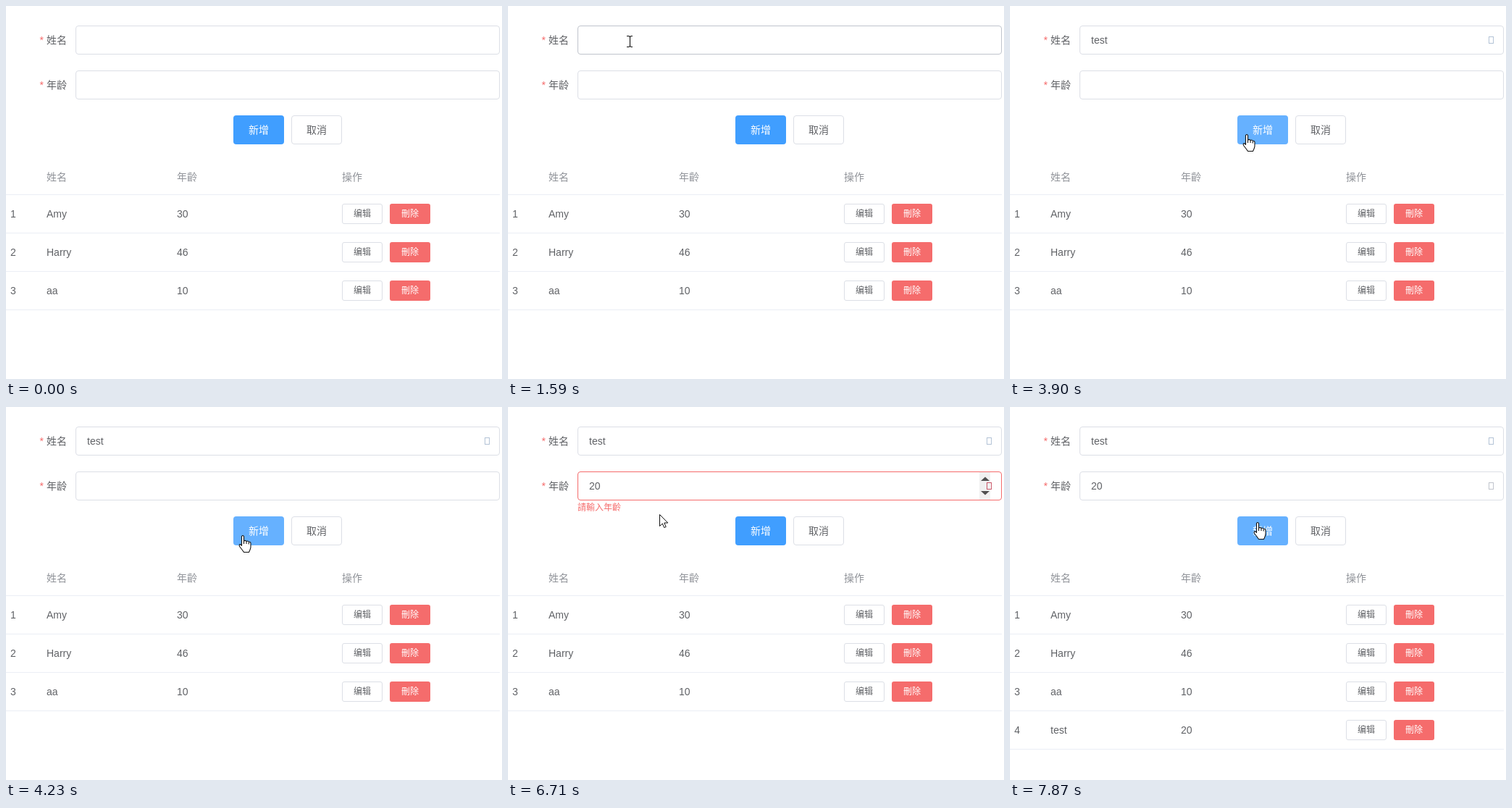
Recreate the animation shown at these times as an HTML page. Size 685x515 px, loop 8 s.

```html
<!DOCTYPE html>
<html lang="zh">
<head>
<meta charset="utf-8">
<style>
html, body { margin: 0; width: 100%; height: 100%; overflow: hidden; background: #fff; }
svg { display: block; width: 685px; height: 515px; }
text { font: 14px "Liberation Sans", "Noto Sans CJK SC", "Noto Sans CJK TC", "Noto Sans CJK", sans-serif; fill: #606266; white-space: pre; }
.head { fill: #909399; }
.mid { text-anchor: middle; }
.small { font-size: 12px; }
.white { fill: #fff; }
.red { fill: #f56c6c; }
</style>
</head>
<body>
<svg id="stage" viewBox="0 0 685 515" xmlns="http://www.w3.org/2000/svg"></svg>
<script>
const LOOP = 8000;
const stage = document.getElementById('stage');

function add(tag, attrs, parent = stage, content) {
  const el = document.createElementNS('http://www.w3.org/2000/svg', tag);
  for (const k in attrs) el.setAttribute(k, attrs[k]);
  if (content !== undefined) el.textContent = content;
  parent.appendChild(el);
  return el;
}
const label = (x, y, s, cls = '', parent = stage) => add('text', { x, y, class: cls }, parent, s);
const box = (x, y, width, height, rx, fill, stroke = 'none', parent = stage) =>
  add('rect', { x, y, width, height, rx, fill, stroke }, parent);
const outline = (x, y, w, h, r, parent = stage) =>
  box(x + .5, y + .5, w - 1, h - 1, r, '#fff', '#dcdfe6', parent);

// Form
function field(y, name) {
  label(46.5, y + 25, '*', 'red');
  label(56, y + 25, name);
  const frame = outline(96, y, 586, 40, 3.5);
  const spin = add('g', {});
  const value = label(112, y + 25, '');
  const caret = box(112, y + 12, 1, 16, 0, '#303133');
  const icon = add('rect', { x: 661.5, y: y + 15.5, width: 6, height: 9, fill: 'none' });
  return { frame, spin, value, caret, icon };
}
const nameField = field(27, '姓名');
const ageField = field(89, '年龄');
box(651, 90, 15, 38, 0, '#f0f0f0', 'none', ageField.spin);
add('path', { d: 'M653 102L659 96.5L665 102ZM653 116L659 121.5L665 116Z', fill: '#505050' }, ageField.spin);
const error = label(96, 143, '請輸入年齡', 'small red');
const addButton = box(314, 151, 70, 40, 4, '#409eff');
label(349, 176, '新增', 'mid white');
outline(394, 151, 70, 40, 3.5);
label(429, 176, '取消', 'mid');

// Table
label(56, 241, '姓名', 'head');
label(236, 241, '年齡', 'head');
label(464, 241, '操作', 'head');
box(0, 260, 682, 1, 0, '#ebeef5');
const rows = [['Amy', 30], ['Harry', 46], ['aa', 10], ['test', 20]].map(([who, age], i) => {
  const g = add('g', { transform: `translate(0 ${261 + i * 53})` });
  label(6, 31, i + 1, '', g);
  label(56, 31, who, '', g);
  label(236, 31, age, '', g);
  outline(464, 12, 56, 28, 2.5, g);
  label(492, 30, '编辑', 'mid small', g);
  const del = box(530, 12, 56, 28, 3, '#f56c6c', 'none', g);
  label(558, 30, '刪除', 'mid small white', g);
  box(0, 52, 682, 1, 0, '#ebeef5', 'none', g);
  return { g, del };
});

// Pointers, each drawn around its hot spot
const pointers = {
  arrow: add('path', {
    d: 'M.5 .5V16.5L4.3 13L6.7 18.5L9.2 17.5L6.8 12H11.8Z',
    fill: '#fff', stroke: '#111', 'stroke-width': 1
  }),
  hand: add('path', {
    d: 'M-1.5 1.5Q0 -.5 1.5 1.5V8Q3.5 6.5 5 8.5Q7 7.3 8.2 9.3Q10.5 8.7 11 11V16Q11 18.5 8.5 23.5H1.5Q-.5 20.5 -4.5 15.5Q-5.5 13 -3.5 12.5L-1.5 14.3ZM1.5 8V12M5 9V12M8.2 10V12.5',
    fill: '#fff', stroke: '#111', 'stroke-width': 1.1, 'stroke-linejoin': 'round'
  }),
  beam: add('path', {
    d: 'M-4 -7.5H-1L.5 -6.5L2 -7.5H4M.5 -6.5V6.5M-4 7.5H-1L.5 6.5L2 7.5H4',
    fill: 'none', stroke: '#111', 'stroke-width': 1.1
  })
};

// time, x, y
const path = [
  [130, 565, 389], [270, 540, 330], [470, 470, 200], [600, 420, 124], [670, 395, 122],
  [800, 366, 160], [900, 326, 173], [970, 294, 174], [1040, 280, 168], [1250, 220, 118],
  [1450, 178, 62], [1600, 167, 48], [3050, 167, 48], [3120, 185, 78], [3200, 215, 136],
  [3340, 255, 181], [3490, 255, 181], [3640, 327, 177], [4300, 327, 177], [4480, 300, 165],
  [4750, 220, 143], [4900, 197, 133], [5120, 197, 133], [5320, 187, 108], [6705, 187, 108],
  [6706, 208, 147], [6780, 228, 163], [6870, 255, 179], [7010, 327, 176], [7200, 341, 165],
  [7600, 341, 152], [7870, 342, 159]
];

function position(t) {
  const i = path.findIndex(p => p[0] > t);
  if (i === 0) return path[0].slice(1);
  if (i < 0) return path[path.length - 1].slice(1);
  const [t0, x0, y0] = path[i - 1], [t1, x1, y1] = path[i];
  const k = (t - t0) / (t1 - t0);
  return [x0 + (x1 - x0) * k, y0 + (y1 - y0) * k];
}
const inside = (x, y, l, top, r, b) => x >= l && x < r && y >= top && y < b;
const during = (t, a, b) => t >= a && t < b;
const ramp = (t, a, d) => Math.min(1, Math.max(0, (t - a) / d));
const pulse = (t, a, b, d) => ramp(t, a, d) - ramp(t, b, d);

function mix(a, b, k) {
  const part = (c, i) => parseInt(c.slice(i, i + 2), 16);
  return 'rgb(' + [1, 3, 5].map(i => Math.round(part(a, i) + (part(b, i) - part(a, i)) * k)) + ')';
}
const show = (el, on) => el.setAttribute('visibility', on ? 'visible' : 'hidden');
const typed = (s, t, start, step) => t < start ? '' : s.slice(0, 1 + Math.floor((t - start) / step));

function draw(t) {
  const [x, y] = position(t);
  const onName = inside(x, y, 96, 27, 682, 67);
  const onAge = inside(x, y, 96, 89, 682, 129);
  const onAdd = inside(x, y, 314, 151, 384, 191);
  const onDelete = inside(x, y, 530, 379, 586, 407);
  const kind = onName || onAge ? 'beam' : onAdd || onDelete ? 'hand' : 'arrow';
  for (const k in pointers) {
    show(pointers[k], t >= 130 && k === kind);
    pointers[k].setAttribute('transform', `translate(${Math.round(x)} ${Math.round(y)})`);
  }

  const nameFocus = pulse(t, 1600, 3600, 200);
  nameField.frame.setAttribute('stroke', mix(onName ? '#c0c4cc' : '#dcdfe6', '#409eff', nameFocus));
  nameField.value.textContent = typed('test', t, 2220, 100);
  nameField.caret.setAttribute('x', t < 2200 ? 112 : 134);
  show(nameField.caret, during(t, 1660, 2130) || during(t, 2520, 3050));
  nameField.icon.setAttribute('stroke', '#b3c3d6');
  show(nameField.icon, t >= 3600);

  const invalid = pulse(t, 4300, 7080, 200);
  ageField.frame.setAttribute('stroke', mix(onAge && t > 130 ? '#c0c4cc' : '#dcdfe6', '#f56c6c', invalid));
  ageField.value.textContent = typed('20', t, 6050, 125);
  ageField.caret.setAttribute('x', t < 6050 ? 112 : 127);
  show(ageField.caret, during(t, 5390, 5920) || during(t, 6170, 6700));
  show(ageField.spin, during(t, 5190, 7080));
  ageField.icon.setAttribute('stroke', mix('#c0c4cc', '#c9586a', invalid));
  show(ageField.icon, t >= 4300);
  error.setAttribute('opacity', pulse(t, 4300, 7080, 300));

  const lit = pulse(t, 800, 920, 100) + pulse(t, 3600, 5350, 100) + ramp(t, 6990, 100);
  addButton.setAttribute('fill', mix('#409eff', '#66b1ff', lit));
  rows[2].del.setAttribute('fill', mix('#f56c6c', '#f78989', pulse(t, 130, 190, 100)));
  show(rows[3].g, t >= 7600);
}

function tick() {
  draw(performance.now() % LOOP);
  requestAnimationFrame(tick);
}
tick();
</script>
</body>
</html>
```
